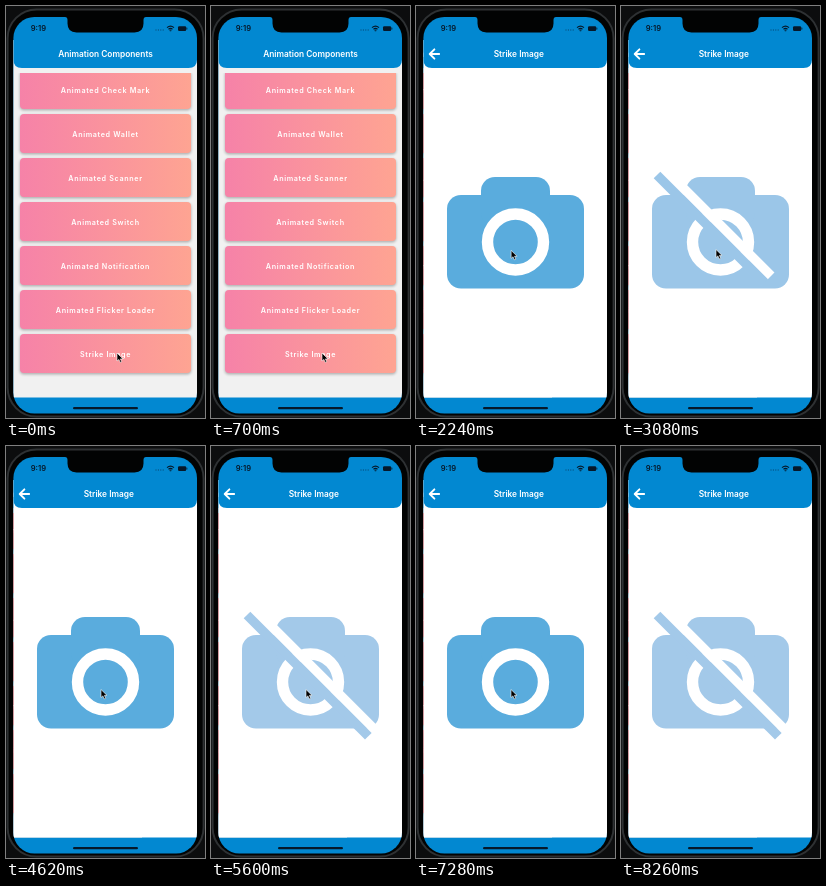
These frames come from a looping animation (199 px wide and 412 px high, 8680 ms). An HTML page:

```html
<!DOCTYPE html>
<html lang="en">
<head>
<meta charset="utf-8">
<title>Animation Components</title>
<style>
  html, body { margin: 0; width: 100%; height: 100%; overflow: hidden; background: #0c0d0e; }
  svg { display: block; width: 100vw; height: 100vh; }
  text { font-family: Inter, sans-serif; font-weight: 600; fill: #fff; text-anchor: middle; }
  .title { font-size: 8.35px; }
  .label { font-size: 7.2px; letter-spacing: .65px; }
  .time { font-size: 7.6px; fill: #06182a; }
</style>
</head>
<body>
<svg viewBox="0 0 199 412">
  <defs>
    <linearGradient id="grad"><stop id="g0"/><stop id="g1" offset="1"/></linearGradient>
    <filter id="soft" x="-10%" y="-30%" width="120%" height="170%"><feGaussianBlur stdDeviation="1.4"/></filter>
    <clipPath id="screen"><rect x="7.4" y="11" width="183.6" height="396.5" rx="21"/></clipPath>
    <clipPath id="stack"><rect x="7" y="34" width="184" height="357.4"/></clipPath>
    <clipPath id="scroll"><rect x="7" y="67" width="184" height="325"/></clipPath>
    <path id="bar" d="M7.4 33H191V53.500Q191 62 182.500 62H15.900Q7.400 62 7.400 53.500Z" fill="#0288d1"/>
  </defs>

  <rect x="1.6" y="3.4" width="196" height="407.2" rx="29" fill="#020303" stroke="#2e3133" stroke-width="2"/>

  <g clip-path="url(#screen)">
    <rect x="7" y="11" width="184" height="397" fill="#0288d1"/>
    <g clip-path="url(#stack)">
      <g id="list">
        <rect x="7" y="34" width="184" height="358" fill="#f1f1f1"/>
        <g id="cards" clip-path="url(#scroll)"></g>
        <use href="#bar"/>
        <text class="title" x="99.5" y="51">Animation Components</text>
        <rect id="dim" x="7" y="34" width="184" height="358"/>
      </g>
      <g id="page">
        <rect x="7.4" y="34" width="184" height="358" fill="#fff"/>
        <use href="#bar"/>
        <path d="M23.2 48H14M18.4 43.3L13.7 48L18.4 52.7" fill="none" stroke="#fff" stroke-width="1.9" stroke-linecap="round" stroke-linejoin="round"/>
        <text class="title" x="102.8" y="51">Strike Image</text>
        <g id="camera">
          <rect x="31" y="189" width="137" height="93.5" rx="14"/>
          <rect x="65" y="171" width="69" height="50" rx="14"/>
          <circle cx="99.5" cy="236" r="28" fill="none" stroke="#fff" stroke-width="11.4"/>
          <path id="gap" fill="none" stroke="#fff" stroke-width="9.4"/>
          <path id="slash" fill="none" stroke-width="9.4"/>
        </g>
      </g>
    </g>
    <path d="M59 11Q61.500 11 61.500 14V17.500Q61.500 26.400 70.500 26.400H128.500Q137.500 26.400 137.500 17.500V14Q137.500 11 140 11Z" fill="#020303"/>
    <text class="time" x="32.400" y="25">9:19</text>
    <path d="M149.500 24H158" stroke="#06406a" stroke-width="1" stroke-dasharray="1 1.400"/>
    <g fill="none" stroke="#06182a" stroke-width="1.200">
      <path d="M161 21.600Q164.500 18.600 168 21.600M162.500 23.200Q164.500 21.600 166.500 23.200"/>
      <circle cx="164.500" cy="24.400" r=".3"/>
    </g>
    <rect x="172" y="20.300" width="8.200" height="4.600" rx="1.200" fill="#06182a"/>
    <rect x="180.500" y="21.700" width=".8" height="1.800" fill="#06182a"/>
    <rect x="67" y="401" width="65" height="2.300" rx="1.150" fill="#06182a"/>
  </g>
  <path id="cursor" d="M0 0V8L1.900 6.400L3.200 9.400L4.700 8.700L3.400 5.900H6Z" fill="#000" stroke="#fff" stroke-width=".6"/>
</svg>
<script>
const LOOP = 8680, PUSH = 730;
const $ = id => document.getElementById(id);
const clamp = v => Math.min(1, Math.max(0, v));
const ease = u => u < .5 ? 2 * u * u : 1 - 2 * (1 - u) ** 2;
const ramp = (t, start, length) => ease(clamp((t - start) / length));
const lerp = (a, b, p) => a + (b - a) * p;
const mix = (a, b, p) => `rgb(${a.map((v, i) => Math.round(lerp(v, b[i], p)))})`;
const move = (id, x, y = 0) => $(id).setAttribute('transform', `translate(${x} ${y})`);

const names = ['Animated Check Mark', 'Animated Wallet', 'Animated Scanner', 'Animated Switch',
  'Animated Notification', 'Animated Flicker Loader', 'Strike Image'];
$('cards').innerHTML = names.map((name, i) => {
  const y = 64 + 44 * i;
  return `<rect x="14" y="${y + 1.3}" width="171" height="39" rx="4" fill="#000" opacity=".3" filter="url(#soft)"/>
    <rect x="14" y="${y}" width="171" height="39" rx="4" fill="url(#grad)"/>
    <text class="label" x="99.5" y="${y + 22.6}">${name}</text>`;
}).join('');

// Each tap toggles the strike
const taps = [2624, 3700, 4680, 6340, 7600];
const strikeAt = t => taps.reduce((sum, tap, i) => sum + (i % 2 ? -1 : 1) * ramp(t, tap, 600), 0);

function line(id, x, y, length) {
  $(id).setAttribute('d', length > .1 ? `M${x} ${y}l${length} ${length}` : '');
}

function draw(t) {
  // Critically damped spring for the screen push
  const s = Math.max(0, t - PUSH) * .011;
  const push = t > 2000 ? 1 : 1 - (1 + s) * Math.exp(-s);
  move('page', 184 * (1 - push));
  move('list', -55 * push);
  $('dim').setAttribute('opacity', .1 * push);
  $('g0').setAttribute('stop-color', mix([246, 130, 168], [248, 78, 85], push));
  $('g1').setAttribute('stop-color', mix([254, 164, 146], [248, 78, 85], push));

  const strike = strikeAt(t), color = mix([90, 172, 221], [163, 201, 233], strike);
  $('camera').setAttribute('fill', color);
  $('slash').setAttribute('stroke', color);
  line('slash', 36, 169, 121.3 * strike);
  line('gap', 42.6, 162.4, 121.3 * strike);

  const m = ramp(t, 1400, 900);
  move('cursor', lerp(111, 95, m), lerp(347, 243.5, m));
  $('cursor').setAttribute('visibility', t < 8240 ? 'visible' : 'hidden');
}

const begin = performance.now();
function tick() {
  draw((performance.now() - begin) % LOOP);
  requestAnimationFrame(tick);
}
tick();
</script>
</body>
</html>
```
